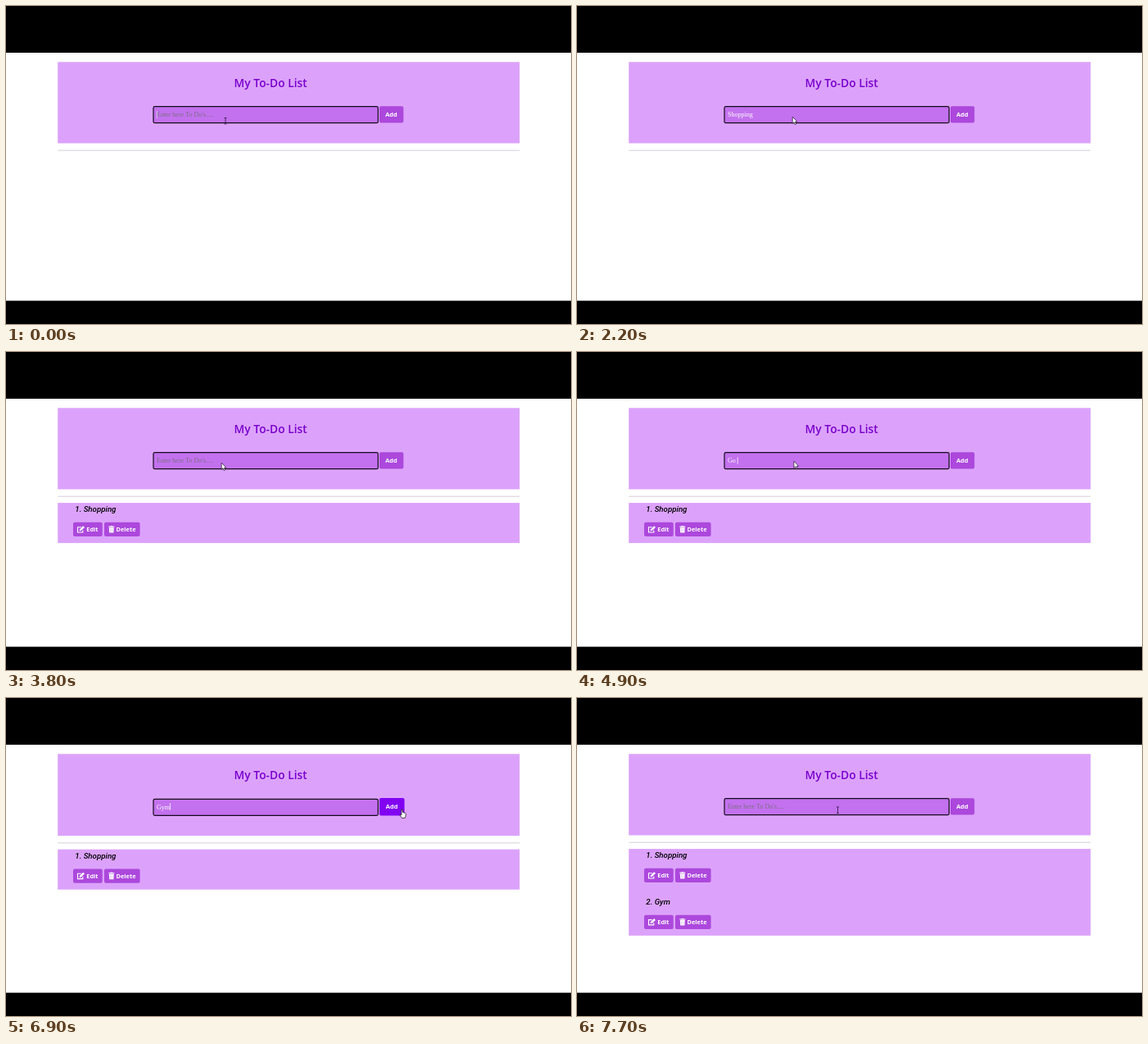
An HTML page with a canvas that plays this animation: 690x388 px, repeating every 8000 ms.

```html
<!DOCTYPE html>
<html lang="en">
<head>
<meta charset="utf-8">
<title>My To-Do List</title>
<style>
  html, body { margin: 0; width: 100%; height: 100%; overflow: hidden; background: #000; }
  canvas { display: block; width: 690px; height: 388px; }
</style>
</head>
<body>
<canvas id="stage"></canvas>
<script>
const W = 690, H = 388, LOOP = 8000, STEP = 100;
const canvas = document.getElementById('stage');
const ctx = canvas.getContext('2d');
const ratio = window.devicePixelRatio || 1;
canvas.width = W * ratio;
canvas.height = H * ratio;
ctx.scale(ratio, ratio);

const UI = '"Open Sans", "Noto Sans", sans-serif';
const SERIF = '8px "Liberation Serif", "Noto Serif", serif';
const PANEL = '#dca2fb', BUTTON = '#ac48dc', HOVER = '#8203f2';
const LEFT = 63.2, WIDE = 564.1;

// Each track lists [start time, value...]
const typed = [
  [0, ''], [300, 'S'], [500, 'Sh'], [900, 'Sho'], [1400, 'Shop'], [1600, 'Shopp'],
  [1700, 'Shoppin'], [1800, 'Shopping'], [2400, ''], [4100, 'G'], [4500, 'Go'],
  [4900, 'Go '], [5200, 'Go'], [5400, ''], [5800, 'G'], [6100, 'Gy'], [6400, 'Gym'], [7000, '']
];
const caretTrack = [
  [0, 1], [100, 0], [300, 1], [800, 0], [900, 1], [1200, 0], [1400, 1], [2200, 0],
  [2400, 1], [2700, 0], [3300, 1], [3800, 0], [4100, 1], [5600, 0], [5800, 1],
  [7000, 0], [7500, 1], [7600, 0]
];
// The pointer glides from each key to the next
const pointer = [
  [0, beam, 268, 140], [300, beam, 268, 140], [400, arrow, 263, 135], [4100, arrow, 263, 135],
  [4300, arrow, 264.7, 133], [6600, arrow, 264.7, 133], [6700, beam, 338, 134],
  [6900, hand, 483, 136], [7100, hand, 483, 136], [7200, beam, 442, 137],
  [7500, beam, 318.4, 136.6], [LOOP, beam, 318.4, 136.6]
];

function at(track, t) {
  let hit = track[0];
  for (const key of track) if (key[0] <= t) hit = key;
  return hit;
}

function rect(x, y, w, h, color) {
  ctx.fillStyle = color;
  ctx.fillRect(x, y, w, h);
}

function round(x, y, w, h, r) {
  ctx.beginPath();
  ctx.roundRect(x, y, w, h, r);
}

function text(str, x, y, font, color) {
  ctx.font = font;
  ctx.fillStyle = color;
  ctx.fillText(str, x, y);
}

function poly(points, fill, stroke, width) {
  ctx.beginPath();
  points.forEach(([x, y]) => ctx.lineTo(x, y));
  ctx.closePath();
  if (fill) { ctx.fillStyle = fill; ctx.fill(); }
  if (stroke) { ctx.strokeStyle = stroke; ctx.lineWidth = width; ctx.stroke(); }
}

function beam() {
  const color = '#2c163c';
  rect(-0.4, -3.7, 0.8, 7.6, color);
  rect(-1.6, -4, 3.2, 0.7, color);
  rect(-1.6, 3.6, 3.2, 0.7, color);
}

function arrow() {
  poly([[0.2, 0.2], [0.2, 8.4], [2, 6.8], [3.2, 9.6], [4.6, 9], [3.4, 6.3], [5.8, 6.1]],
    '#fff', '#1c1024', 0.7);
}

function hand() {
  poly([[0, 0], [1.3, 0], [1.6, 3.5], [4.6, 4.3], [5.4, 5.3], [5, 8.4], [4.2, 10.4],
    [0.6, 10.4], [-2, 7], [-1.6, 6], [-0.2, 7]], '#fff', '#1c1024', 0.8);
}

function editIcon(x, y) {
  ctx.strokeStyle = '#fff';
  ctx.lineWidth = 1.1;
  ctx.beginPath();
  ctx.moveTo(x + 5, y + 1.7);
  ctx.lineTo(x + 0.7, y + 1.7);
  ctx.lineTo(x + 0.7, y + 8);
  ctx.lineTo(x + 7, y + 8);
  ctx.lineTo(x + 7, y + 5.4);
  ctx.stroke();
  poly([[x + 2.8, y + 6.3], [x + 3.1, y + 4.4], [x + 7.4, y + 0.2], [x + 9.2, y + 2],
    [x + 4.8, y + 6.1]], '#fff');
}

function trashIcon(x, y) {
  rect(x, y + 0.6, 7, 1.1, '#fff');
  rect(x + 2.2, y, 2.6, 0.9, '#fff');
  poly([[x + 0.5, y + 2.2], [x + 6.5, y + 2.2], [x + 6.1, y + 8.6], [x + 0.9, y + 8.6]], '#fff');
  for (let i = 0; i < 3; i++) rect(x + 1.8 + i * 1.5, y + 3.4, 0.35, 4, '#c98be8');
}

function button(label, x, y, w, h, textX, color, size) {
  round(x, y, w, h, 2);
  ctx.fillStyle = color;
  ctx.fill();
  text(label, textX, y + h / 2 + 2.7, `700 ${size}px ${UI}`, '#fff');
}

function item(label, y, icons) {
  text(label, 84.3, y + 11, 'italic 500 9.7px Roboto, "Liberation Sans", sans-serif', '#000');
  const top = y + 23.7;
  if (icons) {
    button('Edit', 82, top, 35.7, 17.3, 98.3, BUTTON, 7.4);
    button('Delete', 120, top, 43.6, 17.3, 134.5, BUTTON, 7.4);
    editIcon(86.8, top + 4.2);
    trashIcon(125.3, top + 4.2);
  } else {
    button('Edit', 82, top, 33, 17.3, 95.8, BUTTON, 7.4);
    button('Delete', 117, top, 43, 17.3, 131, BUTTON, 7.4);
  }
}

function field(t, focused, shift) {
  const value = at(typed, t)[1];
  round(180, 122.7 + shift, 274.4, 20, 1.8);
  ctx.fillStyle = '#c371ee';
  ctx.fill();
  ctx.strokeStyle = focused ? '#140a1c' : '#7d08c4';
  ctx.lineWidth = focused ? 1.2 : 1.6;
  ctx.stroke();
  const y = 135.3 + shift;
  if (value) text(value, 184, y, SERIF, '#fff');
  else text("Enter here To Do's.....", 184, y, SERIF, '#7b6f83');
  if (at(caretTrack, t)[1]) {
    ctx.font = SERIF;
    rect(184 + ctx.measureText(value).width, 128.2, 0.7, 8.6, value ? '#fff' : '#eee0f8');
  }
}

function drawPointer(t) {
  const from = at(pointer, t);
  const to = pointer[pointer.indexOf(from) + 1];
  const p = (t - from[0]) / (to[0] - from[0]);
  ctx.save();
  ctx.translate(from[2] + (to[2] - from[2]) * p, from[3] + (to[3] - from[3]) * p);
  from[1]();
  ctx.restore();
}

function draw(t) {
  const hover = t >= 6900 && t < 7200;
  const focused = t < 7000 || t >= 7500;
  const shift = hover ? 0.6 : 0;
  const count = t < 2400 ? 0 : t < 7000 ? 1 : 2;
  const icons = t >= 2500;

  rect(0, 0, W, H, '#000');
  rect(0, 57, W, 302.6, '#fff');
  rect(LEFT, 68.3, WIDE, 99.2 + shift, PANEL);
  text('My To-Do List', 278.6, 98.8, `600 13.8px ${UI}`, '#7900cc');
  field(t, focused, shift);
  if (hover) button('Add', 456, 122, 30.6, 21.4, 463.8, HOVER, 7.5);
  else button('Add', 456, 122.2, 29.4, 20.2, 463.2, BUTTON, 7.5);

  rect(LEFT, 175.6 + shift, WIDE, 1.2, '#dcd6df');
  if (count) {
    const top = 184.1 + shift;
    rect(LEFT, top, WIDE, count === 1 ? 49 : 105.8, PANEL);
    item('1. Shopping', top, icons);
    if (count === 2) item('2. Gym', top + 56.9, icons);
  }
  drawPointer(t);
}

function tick() {
  const t = performance.now() % LOOP;
  draw(Math.floor(t / STEP) * STEP);
  requestAnimationFrame(tick);
}
tick();
</script>
</body>
</html>
```
